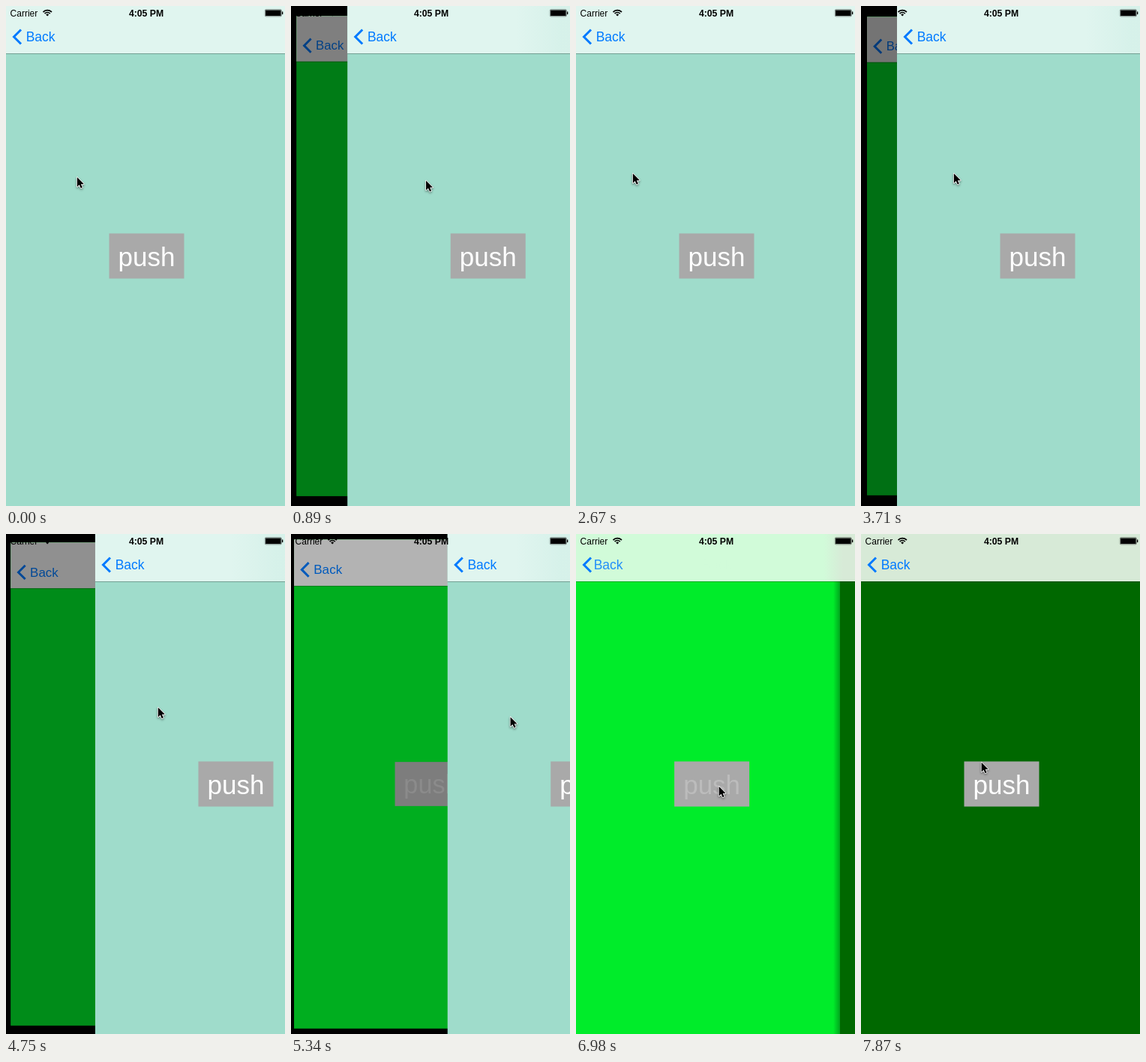
Write an HTML page with a canvas that moves like this. It is 372 by 665 pixels and loops after 8000 ms.

```html
<!DOCTYPE html>
<html lang="en">
<head>
<meta charset="utf-8">
<title>Swipe back and push</title>
<style>
  html, body { margin: 0; width: 100%; height: 100%; overflow: hidden; background: #000; }
  canvas { display: block; width: 372px; height: 665px; }
</style>
</head>
<body>
<canvas id="stage"></canvas>
<script>
const W = 372, H = 665, BAR = 63;
const LOOP = 8000, STEPS = 54, STEP = LOOP / STEPS;
const RELEASE = 5481, POP_END = 6450, PUSH_START = 6934.5;
const FONT = '"Liberation Sans", Arial, sans-serif';
const BLUE = '#007aff';

const MINT = { bg: '#9fdccb', bar: '#e0f5ef', text: '#fff' };
const GREEN = { bg: '#00ec2a', bar: '#d1fbd9', text: '#bcbcbc' };
const GREEN_FLAT = { ...GREEN, bar: '#f3f3f3' };
const DARK = { bg: '#006800', bar: '#d7ead7', text: '#fff' };

const canvas = document.getElementById('stage');
const ratio = window.devicePixelRatio || 1;
canvas.width = W * ratio;
canvas.height = H * ratio;
const ctx = canvas.getContext('2d');

// 0 before a, 1 after b, smooth between
function ease(t, a, b) {
  const u = Math.min(1, Math.max(0, (t - a) / (b - a)));
  return u * u * (3 - 2 * u);
}

function spring(t) {
  const k = Math.max(0, t) * 0.013;
  return 1 - (1 + k) * Math.exp(-k);
}

// A cancelled swipe, then a second one that speeds up until let go
function dragged(t) {
  const first = 111 * (ease(t, 150, 1340) - ease(t, 1600, 2397));
  const pull = Math.max(0, Math.min(t, RELEASE) - 4150) / 591;
  return first + 50 * ease(t, 3000, 3800) + 69 * pull ** 1.2;
}

function pageOffset(t) {
  const x = dragged(t);
  if (t <= RELEASE) return x;
  const rest = (W - x) * Math.exp((RELEASE - t) / 132);
  return rest < 1 ? W : W - rest;
}

function pointer(t) {
  const grip = 94 + 10 * ease(t, 150, 600) - 29 * ease(t, 2000, 2667) + 8 * ease(t, 4150, 4741);
  const x = grip + dragged(t) + 29 * ease(t, RELEASE, 5630)
    - 155 * ease(t, 5700, 6370) - 30 * ease(t, 7100, 7850);
  const y = 227 + 12 * ease(t, 150, 1926) - 17 * ease(t, 2000, 2667)
    + 8 * ease(t, 4150, 4741) + 17 * ease(t, 4741, 5630)
    + 88 * ease(t, 5700, 6370) - 32 * ease(t, 7100, 7850);
  return [x, y];
}

function rect(x, y, w, h, fill) {
  ctx.fillStyle = fill;
  ctx.fillRect(x, y, w, h);
}

function text(str, x, y, font, fill, align = 'left') {
  ctx.font = font + ' ' + FONT;
  ctx.textAlign = align;
  ctx.fillStyle = fill;
  ctx.fillText(str, x, y);
}

function path(points, close) {
  ctx.beginPath();
  points.forEach(([x, y]) => ctx.lineTo(x, y));
  if (close) ctx.closePath();
}

function gradient(x0, x1, from, to) {
  const g = ctx.createLinearGradient(x0, 0, x1, 0);
  g.addColorStop(0, from);
  g.addColorStop(1, to);
  return g;
}

function content(page, x) {
  rect(x, 0, W, H, page.bg);
  rect(x + 137.5, 302.5, 100, 60, '#a9a9a9');
  text('push', x + 187.5, 345.7, '35px', page.text, 'center');
}

function barLine() {
  rect(0, BAR, W, 1, 'rgba(0,0,0,.28)');
}

function chevron() {
  path([[20, 31.5], [10.5, 41], [20, 50.5]]);
  ctx.strokeStyle = BLUE;
  ctx.lineWidth = 3;
  ctx.stroke();
}

function backLabel(x, alpha = 1) {
  ctx.globalAlpha = alpha;
  text('Back', x, 47, '17.5px', BLUE);
  ctx.globalAlpha = 1;
}

function fullPage(page) {
  content(page, 0);
  rect(0, 0, W, BAR, page.bar);
  barLine();
  chevron();
  backLabel(26.7);
}

function swipe(x, under) {
  const p = x / W;
  if (x > 0) {
    const s = 0.95 + 0.05 * p;
    rect(0, 0, W, H, '#000');
    ctx.save();
    ctx.translate(W * (1 - s) / 2, H * (1 - s) / 2);
    ctx.scale(s, s);
    fullPage(under);
    rect(0, 0, W, H, `rgba(0,0,0,${0.6 * (1 - p)})`);
    ctx.restore();
  }
  if (x >= W) return;
  ctx.save();
  ctx.translate(x, 0);
  fullPage(MINT);
  ctx.restore();
  if (x > 0) {
    const left = Math.max(x, 300);
    rect(left, 0, W - left, BAR, gradient(300, 360, 'rgba(159,220,203,0)', 'rgba(159,220,203,.15)'));
  }
}

function push(p) {
  const edge = W * (1 - p);
  content(GREEN, -0.32 * W * p);
  rect(edge - 9, 0, 9, H, gradient(edge - 9, edge, 'rgba(0,0,0,0)', 'rgba(0,0,0,.3)'));
  content(DARK, edge);
  rect(0, 0, W, BAR, gradient(edge - 22, edge + 4, GREEN.bar, DARK.bar));
  barLine();
  chevron();
  backLabel(26.7 - 56 * p, Math.max(0, 1 - 3 * p));
  backLabel(26.7 + 150 * (1 - p), p * p);
}

function statusBar() {
  text('Carrier', 5.6, 13.5, '12px', '#000');
  text('4:05 PM', 187, 13.5, 'bold 12.2px', '#000', 'center');

  ctx.strokeStyle = ctx.fillStyle = '#000';
  const fan = r => {
    ctx.beginPath();
    ctx.arc(55.2, 13.4, r, -Math.PI * 0.76, -Math.PI * 0.24);
  };
  ctx.lineWidth = 1.7;
  for (const r of [4.9, 7.8]) {
    fan(r);
    ctx.stroke();
  }
  fan(2.7);
  ctx.lineTo(55.2, 13.6);
  ctx.fill();

  ctx.lineWidth = 0.4;
  ctx.beginPath();
  ctx.roundRect(345.2, 4.7, 22.2, 9.2, 1.5);
  ctx.stroke();
  rect(346, 5.5, 20.6, 7.6, '#000');
  rect(368, 7.5, 1.3, 3.6, '#000');
}

function cursor(x, y) {
  ctx.save();
  ctx.translate(x + 0.4, y + 0.8);
  ctx.scale(0.87, 0.87);
  path([[0.5, 0], [0.5, 14.6], [3.8, 11.4], [6.2, 16.6], [8.6, 15.5], [6.3, 10.5], [10.8, 10.4]], true);
  ctx.shadowColor = 'rgba(0,0,0,.45)';
  ctx.shadowBlur = 3 * ratio;
  ctx.shadowOffsetY = 1.5 * ratio;
  ctx.strokeStyle = '#fff';
  ctx.lineWidth = 1.8;
  ctx.lineJoin = 'round';
  ctx.stroke();
  ctx.shadowColor = 'transparent';
  ctx.fillStyle = '#000';
  ctx.fill();
  ctx.restore();
}

function draw(t) {
  ctx.setTransform(ratio, 0, 0, ratio, 0, 0);
  if (t < POP_END) swipe(pageOffset(t), GREEN_FLAT);
  else if (t < PUSH_START) fullPage(GREEN);
  else {
    const p = spring(t - PUSH_START);
    if (p > 0.997) fullPage(DARK);
    else push(p);
  }
  statusBar();
  cursor(...pointer(t));
}

// The motion is shown in even steps, like a screen recording
const start = performance.now();
function tick(now) {
  const t = Math.max(0, now - start) % LOOP;
  draw(Math.floor(t / STEP) * STEP);
  requestAnimationFrame(tick);
}
draw(0);
requestAnimationFrame(tick);
</script>
</body>
</html>
```
